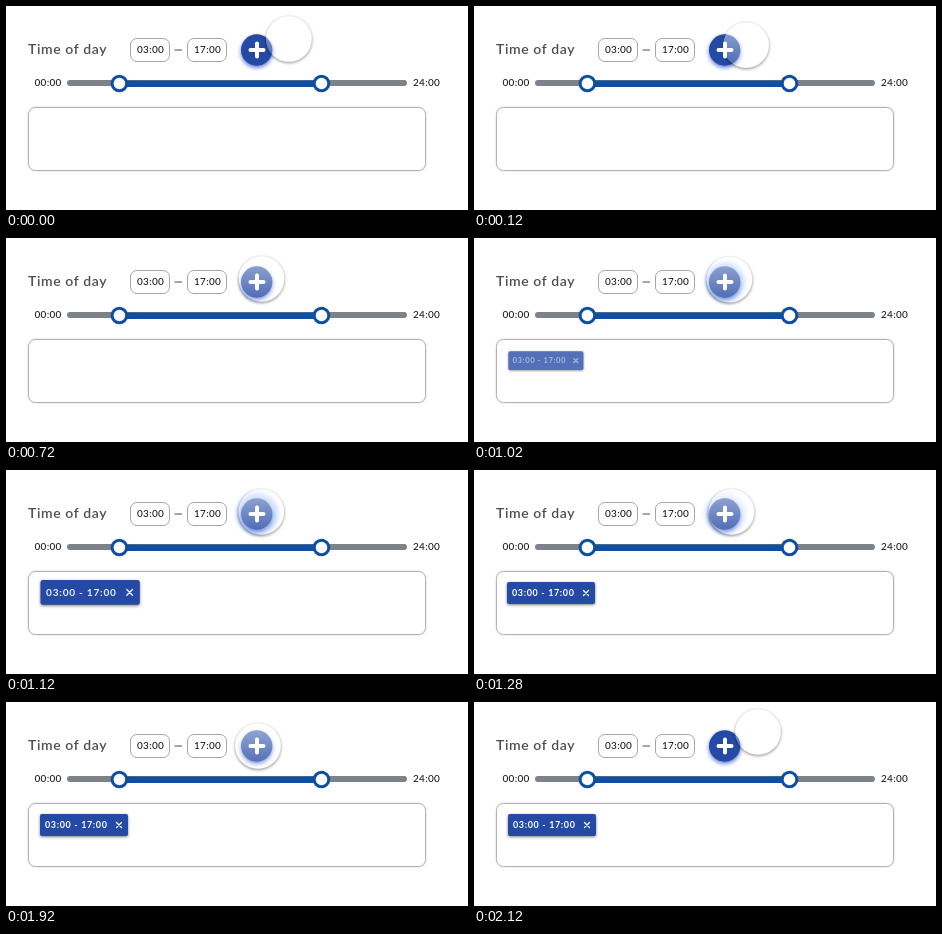
Recreate the animation shown at these times as an HTML page. Size 462 by 204 pixels, loop 2140 ms.

```html
<!DOCTYPE html>
<html lang="en">
<head>
<meta charset="utf-8">
<title>Time range picker</title>
<style>
  html, body { margin: 0; width: 100%; height: 100%; overflow: hidden; background: #fff; }
  svg { display: block; width: 462px; height: 204px; }
  text { font-family: Lato, "Open Sans", sans-serif; }
  .time { font-size: 10px; font-weight: 500; letter-spacing: .28px; fill: #1c1c1c; }
  .title { font-size: 14px; font-weight: 600; letter-spacing: .61px; fill: #4e4e4e; }
  .chip-label { font-size: 9px; font-weight: 700; letter-spacing: .65px; fill: #fff; }
  .field { fill: #fff; stroke: #a6a6a2; }
  .knob { fill: #fff; stroke: #0f4fa3; stroke-width: 3; }
  .panel { fill: #fff; stroke: #b2b2b2; filter: drop-shadow(0 0 1px rgba(0,0,0,.16)); }
  .button { fill: #244aa5; filter: drop-shadow(0 2px 2px rgba(36,74,190,.75)); }
  .chip-box { fill: #244aa5; filter: drop-shadow(0 1.5px 1.5px rgba(0,0,0,.5)); }
  .line { fill: none; stroke-linecap: round; }
</style>
</head>
<body>
<svg viewBox="0 0 462 204">
  <defs>
    <linearGradient id="glass" x1="0" y1="0" x2="0" y2="1">
      <stop offset="0" stop-color="#fff" stop-opacity=".56"/>
      <stop offset="1" stop-color="#fff" stop-opacity=".16"/>
    </linearGradient>
    <filter id="soft" x="-30%" y="-30%" width="160%" height="160%">
      <feGaussianBlur stdDeviation="1.4"/>
    </filter>
    <filter id="glowBlur" x="-40%" y="-40%" width="180%" height="180%">
      <feGaussianBlur stdDeviation="2"/>
    </filter>
    <mask id="outside" maskUnits="userSpaceOnUse" x="-35" y="-35" width="70" height="70">
      <rect x="-35" y="-35" width="70" height="70" fill="#fff"/>
      <circle r="22.8" fill="#000"/>
    </mask>
  </defs>

  <text class="title" x="22" y="48">Time of day</text>
  <rect class="field" x="124.5" y="32.5" width="39" height="23" rx="6.500"/>
  <rect class="field" x="181.5" y="32.5" width="39" height="23" rx="6.500"/>
  <text class="time" x="131" y="47">03:00</text>
  <text class="time" x="188" y="47">17:00</text>
  <path class="line" d="M169 44H175.500" stroke="#888" stroke-width="1.3"/>

  <text class="time" x="28.500" y="80">00:00</text>
  <text class="time" x="407" y="80">24:00</text>
  <path class="line" d="M64 77H398" stroke="#7c8287" stroke-width="6"/>
  <path class="line" d="M113 77.800H315" stroke="#0f4fa3" stroke-width="6.400"/>
  <circle class="knob" cx="113.400" cy="77.500" r="7.300"/>
  <circle class="knob" cx="315.500" cy="77.500" r="7.300"/>

  <rect class="panel" x="22.500" y="101.500" width="397" height="63" rx="7"/>

  <g id="chip">
    <rect class="chip-box" y="-11" width="88" height="22" rx="2"/>
    <g id="chipLabel">
      <text class="chip-label" x="5" y="3.200">03:00 - 17:00</text>
      <path class="line" d="M76.500 -2.500l5 5m0 -5l-5 5" stroke="#fff" stroke-width="1.3"/>
    </g>
  </g>

  <circle id="glow" cx="251.500" cy="43.500" fill="#8fb8fc" filter="url(#glowBlur)"/>
  <circle class="button" cx="250.700" cy="44" r="15.700"/>
  <g id="cursor">
    <g mask="url(#outside)">
      <circle cy="1" r="23" fill="#000" opacity=".42" filter="url(#soft)"/>
    </g>
    <circle r="23" fill="url(#glass)"/>
  </g>
  <path class="line" d="M244.500 44H257.500M251 37.500V50.500" stroke="#fff" stroke-width="4"/>
</svg>
<script>
  const LOOP = 2140;
  const byId = id => document.getElementById(id);
  const [cursor, chip, chipLabel, glow] = ["cursor", "chip", "chipLabel", "glow"].map(byId);
  const clamp = v => Math.min(1, Math.max(0, v));
  const smooth = v => v * v * (3 - 2 * v);
  const mix = (a, b, p) => a + (b - a) * p;

  // Keys are [time, value...]; every value eases between neighbouring keys.
  function track(keys, t) {
    const next = keys.findIndex(key => key[0] > t);
    if (next < 0) return keys[keys.length - 1].slice(1);
    if (next === 0) return keys[0].slice(1);
    const a = keys[next - 1], b = keys[next];
    const p = smooth((t - a[0]) / (b[0] - a[0]));
    return a.slice(1).map((v, i) => mix(v, b[i + 1], p));
  }

  const cursorKeys = [
    [720, 255.5, 41], [880, 255.5, 41], [1120, 255.3, 42], [1280, 257.4, 42],
    [1380, 258, 42], [1760, 258, 42], [1920, 252, 44], [2120, 284, 30]
  ];
  const chipKeys = [ // x, y, scale
    [880, 34, 123, .3], [1110, 34.5, 122.4, 1.13], [1280, 33, 123, 1],
    [1400, 33, 123, 1], [1480, 34, 123, 1]
  ];
  const glowKeys = [ // radius, opacity
    [880, 15, 0], [1080, 21, .7], [1280, 21, .3], [1380, 21, 0]
  ];

  function cursorAt(t) {
    if (t >= 720) return track(cursorKeys, t);
    const p = 1 - (1 - clamp(t / 540)) ** 2;
    return [mix(283, 255.7, p), mix(33, 41.3, p) + 12 * p * (1 - p)];
  }

  function draw(t) {
    cursor.setAttribute("transform", `translate(${cursorAt(t)})`);

    const [x, y, scale] = track(chipKeys, t);
    chip.setAttribute("transform", `translate(${x} ${y}) scale(${scale})`);
    chip.setAttribute("opacity", clamp((t - 880) / 180));
    chipLabel.setAttribute("opacity", clamp((t - 900) / 245));

    const [radius, opacity] = track(glowKeys, t);
    glow.setAttribute("r", radius);
    glow.setAttribute("opacity", opacity);
  }

  const start = performance.now();
  function tick() {
    draw((performance.now() - start) % LOOP);
    requestAnimationFrame(tick);
  }
  tick();
</script>
</body>
</html>
```
